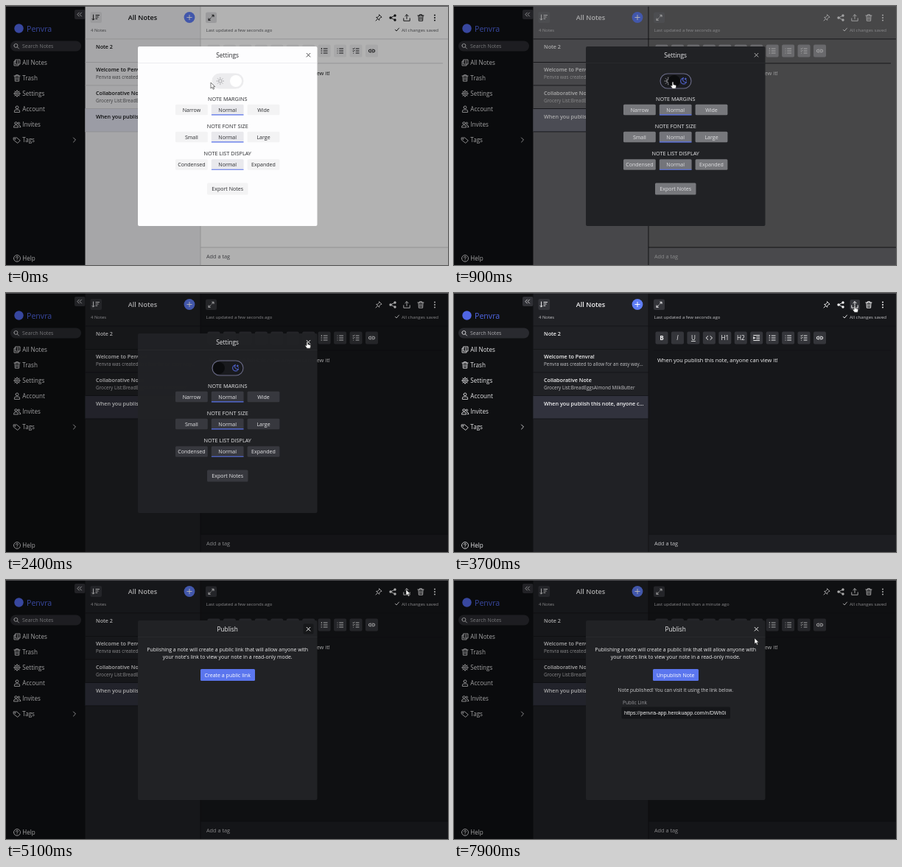
Write an HTML page that moves like this. It is 600 px wide and 352 px high and loops after 8000 ms.

```html
<!DOCTYPE html>
<html lang="en">
<head>
<meta charset="utf-8">
<title>Notes</title>
<style>
html, body { margin: 0; width: 100%; height: 100%; overflow: hidden; background: #0f1012; }
svg { display: block; width: 600px; height: 352px; }
text { font-family: "Open Sans", "Noto Sans", sans-serif; white-space: pre; }
.b { font-weight: 600; }
.m { text-anchor: middle; }
.i { fill: none; stroke-width: .95; stroke-linecap: round; stroke-linejoin: round; }
.side { fill: #e6e6e8; }
.side .i { stroke: #e6e6e8; stroke-width: .85; }
.ink { fill: var(--ink); }
.i.ink { fill: none; stroke: var(--ink); }
.sub { fill: var(--sub); }
.mtext { fill: var(--mtext); }
.glyph { opacity: var(--glyph); }
</style>
</head>
<body>
<svg id="stage" viewBox="0 0 600 352" xmlns="http://www.w3.org/2000/svg"></svg>
<script>
const LOOP = 8000;
const stage = document.getElementById('stage');
const APP = 'Penvra';

const rect = (x, y, w, h, fill, r = 0, more = '') =>
  `<rect x="${x}" y="${y}" width="${w}" height="${h}" rx="${r}" fill="${fill}" ${more}/>`;
const text = (x, y, size, str, cls = '', more = '') =>
  `<text x="${x}" y="${y}" font-size="${size}" class="${cls}" ${more}>${str}</text>`;
const icon = (x, y, d, cls = '', more = '') =>
  `<path class="i ${cls}" transform="translate(${x} ${y})" d="${d}" ${more}/>`;
const dot = (r, x = 0, y = 0) => `M${x - r} ${y}a${r} ${r} 0 1 0 ${2 * r} 0a${r} ${r} 0 1 0 ${-2 * r} 0`;
const rays = (n, a, b) => Array.from({ length: n }, (_, k) => {
  const c = Math.cos(k * 2 * Math.PI / n), s = Math.sin(k * 2 * Math.PI / n);
  return `M${(c * a).toFixed(2)} ${(s * a).toFixed(2)}L${(c * b).toFixed(2)} ${(s * b).toFixed(2)}`;
}).join('');

const D = {
  notes: 'M-2-4h6v6h-6zM-2-2h-2v6h6v-2M0-2h2M0 0h2',
  trash: 'M-4-3h8M-1.5-3v-1.3h3v1.3M-3-3l.4 7.2h5.2l.4-7.2M-1-1v3.4M1-1v3.4',
  gear: dot(1.4) + dot(3.3) + rays(8, 3.4, 4.4),
  user: dot(1.9, 0, -2.2) + 'M-3.6 4v-1q0-2 2-2h3.2q2 0 2 2v1z',
  users: dot(1.6, -1.5, -1.8) + dot(1.3, 2.3, -1.6) + 'M-4.6 3.6q0-3 3.1-3t3.1 3zM2.3.9q2.6 0 2.6 2.7h-1.5',
  tag: 'M-4.5-3h4.2l4.6 4-3.6 3.4-5.2-4.2z' + dot(.5, -2.6, -1.2),
  help: dot(4.5) + 'M-1.4-1q0-1.5 1.4-1.5t1.4 1.3q0 .8-1.4 1.5v.6M0 2.4v.1',
  search: dot(2.5, -.6, -.6) + 'M1.3 1.3l2.2 2.2',
  sort: 'M-3.5-3.5v7l-1.5-1.5M-3.5 3.5l1.5-1.5M0-3h4.5M0-.6h3.2M0 1.8h1.8',
  expand: 'M.8-.8l2.6-2.6M1.2-3.5h2.3v2.3M-.8.8l-2.6 2.6M-1.2 3.5h-2.3v-2.3',
  pin: 'M.8-4l3.2 3.2-1.5.4-1.7 1.8-.2 1.9-3.9-3.9 1.9-.2 1.8-1.7zM-1.3 1.3l-2.7 2.7',
  share: 'M3-3l-6 3 6 3',
  upload: 'M0 1.5v-5.7M-2.2-2.2l2.2-2.2 2.2 2.2M-4.2.8v3.4h8.4v-3.4',
  check: 'M-2.6.2l1.7 1.8 3.3-3.9',
  code: 'M-1.6-2.4l-2.6 2.4 2.6 2.4M1.6-2.4l2.6 2.4-2.6 2.4',
  indent: 'M-4-3.5h8M0-1.2h4M0 1.2h4M-4 3.5h8M-3.8-1.2l2 1.2-2 1.2z',
  ol: 'M-1-3h5M-1 0h5M-1 3h5M-3.8-3.6v1.3M-4.2 0h.8M-4.2 3h.8',
  ul: 'M-1-3h5M-1 0h5M-1 3h5M-3.6-3v.1M-3.6 0v.1M-3.6 3v.1',
  todo: 'M0-3h4M0 0h4M0 3h4M-4.2-3l.7.8 1.4-1.6M-4.2 0l.7.8 1.4-1.6M-3.4 3v.1',
  link: 'M-.8 1.8h-1.6a1.8 1.8 0 0 1 0-3.6h1.6M.8-1.8h1.6a1.8 1.8 0 0 1 0 3.6h-1.6M-1.8 0h3.6',
  close: 'M-2.4-2.4l4.8 4.8M2.4-2.4l-4.8 4.8',
  moon: 'M-.4-4.2a4.2 4.2 0 1 0 4.6 5.6a3.8 3.8 0 0 1-4.6-5.6zM2.8-4v2.2M1.7-2.9h2.2M4-.6v.1'
};

function sidebar() {
  const rows = [['notes', 'All Notes', 77], ['trash', 'Trash', 98], ['gear', 'Settings', 119],
    ['user', 'Account', 140], ['users', 'Invites', 161], ['tag', 'Tags', 182], ['help', 'Help', 343]];
  return rect(0, 0, 107.5, 352, '#0f1012') + rect(93, 5, 14.5, 13, '#303136', 2) +
    `<g class="side">` +
    icon(99.7, 11.5, 'M-.4-2.5l-2.4 2.5 2.4 2.5M2.8-2.5l-2.4 2.5 2.4 2.5') +
    rect(6, 47.5, 96, 14, '#292a2f', 7) + icon(14, 54.5, D.search) +
    text(22, 57, 6.9, 'Search Notes', '', 'fill="#a9a9ad"') +
    rows.map(([d, s, y]) => icon(15, y, D[d]) + text(22.3, y + 3, 8.1, s)).join('') +
    icon(93, 182, 'M-1.5-3l3 3-3 3') + `</g>` +
    `<circle cx="17.5" cy="30.5" r="6.2" fill="#5066e4"/>` +
    text(28, 34.6, 10.6, APP, '', 'fill="#5066e4" font-weight="500"');
}

function noteList() {
  return rect(107.5, 0, 156.5, 352, 'var(--list)') +
    rect(107.5, 139.5, 156.5, 31.5, 'var(--sel)') +
    [0, 1, 2, 3, 4].map(n => rect(107.5, 44.5 + n * 31.5, 156.5, .8, 'var(--line)')).join('') +
    rect(114.5, 8, 15.5, 15, 'var(--chip)', 2) + icon(122, 15.5, D.sort, 'ink glyph') +
    text(185.5, 18.9, 9.1, 'All Notes', 'b m ink') +
    `<circle cx="249" cy="15.5" r="7.4" fill="#5f7df4"/>` +
    icon(249, 15.5, 'M-3.2 0h6.4M0-3.2v6.4', '', 'stroke="#fff"') +
    text(115, 35, 5.9, '4 Notes', 'sub') +
    text(122, 57.6, 7.2, 'Note 2', 'b ink') +
    text(122, 89.4, 7.2, `Welcome to ${APP}!`, 'b ink') +
    text(122, 99, 6.35, `${APP} was created to allow for an easy way...`, 'sub') +
    text(122, 121.2, 7.2, 'Collaborative Note', 'b ink') +
    text(122, 130.6, 6.35, 'Grocery List:BreadEggsAlmond MilkButter', 'sub') +
    text(122, 153, 7.2, 'When you publish this note, anyone c...', 'b ink');
}

function editor() {
  const tools = ['B', 'I', 'U', 'code', 'H1', 'H2', 'indent', 'ol', 'ul', 'todo', 'link'];
  const style = { B: 'font-weight="700"', I: 'font-style="italic"', U: 'text-decoration="underline"' };
  const bar = tools.map((k, n) => {
    const x = 282 + n * 21.45;
    return rect(x - 8.5, 52.5, 17, 17, 'var(--tool)', 2) +
      (D[k] ? icon(x, 61, D[k], 'ink glyph') : text(x, 64, 8.2, k, 'm ink glyph', style[k] || ''));
  }).join('');
  return rect(264, 0, 336, 352, 'var(--ed)') + rect(264, 328, 336, 24, 'var(--foot)') +
    rect(263.5, 0, .9, 352, 'var(--line)') + rect(264, 44.5, 336, .8, 'var(--line)') +
    rect(271, 77.5, 322, .8, 'var(--line)') + rect(264, 327.6, 336, .9, 'var(--line)') +
    rect(271, 8.5, 15, 14.5, 'var(--chip)', 2) + icon(278.5, 15.8, D.expand, 'ink glyph') +
    `<text id="saved" x="271.5" y="34.6" font-size="6.05" class="sub"></text>` +
    icon(531, 32, D.check, 'ink', 'stroke-width=".8"') + text(537, 34.6, 6.1, 'All changes saved', 'sub') +
    rect(537.5, 9, 13.5, 14, 'var(--chip)', 2, 'id="hover"') +
    `<g class="glyph">` +
    icon(506, 16, D.pin, 'ink') + icon(525, 16, D.share, 'ink') +
    [[522, 16], [528, 13], [528, 19]].map(([x, y]) => `<circle class="ink" cx="${x}" cy="${y}" r="1.7"/>`).join('') +
    icon(544, 16, D.upload, 'ink') + icon(563, 16, D.trash, 'ink') +
    [-3.4, 0, 3.4].map(d => `<circle class="ink" cx="582" cy="${16 + d}" r="1"/>`).join('') +
    text(276, 94.2, 7.43, 'When you publish this note, anyone can view it!', 'ink') + `</g>` +
    bar + text(272, 343.4, 7.3, 'Add a tag', 'sub');
}

function settings() {
  const groups = [['NOTE MARGINS', 129, ['Narrow', 'Normal', 'Wide']],
    ['NOTE FONT SIZE', 166, ['Small', 'Normal', 'Large']],
    ['NOTE LIST DISPLAY', 203.4, ['Condensed', 'Normal', 'Expanded']]];
  const body = groups.map(([title, y, names]) => text(300.7, y, 7.3, title, 'm mtext') +
    names.map((s, n) => {
      const x = 230 + n * 48.8;
      return rect(x, y + 4.8, 43.8, 14.5, n === 1 ? 'var(--on)' : 'var(--btn)', 1.5) +
        (n === 1 ? rect(x, y + 18.3, 43.8, 1.1, '#5872ec', .5) : '') +
        text(x + 21.9, y + 14.7, 7.05, s, 'm mtext glyph');
    }).join('')).join('');
  return `<g id="settings">` + text(300.7, 69.6, 8.3, 'Settings', 'm mtext') +
    rect(280, 92, 42, 20, 'var(--pill)', 10, 'stroke="var(--rim)" stroke-width="1.1"') +
    icon(290.8, 102, dot(2.2) + rays(8, 3.7, 4.8), '', 'style="stroke:var(--sun);stroke-width:.8"') +
    icon(311.5, 102, D.moon, '', 'id="moon" stroke="#5a70ee"') +
    `<circle id="knob" cy="102" r="8" fill="var(--knob)"/>` + body +
    rect(273, 240.5, 55.5, 16, 'var(--btn)', 1.5) + text(300.7, 251.2, 7.05, 'Export Notes', 'm mtext glyph') + `</g>`;
}

function publish() {
  const action = (id, x, w, s) => `<g id="${id}">` + rect(x, 121, w, 16, '#5b76ee', 1.5) +
    text(300.7, 131.6, 7.05, s, 'm', 'fill="#fff"') + `</g>`;
  return `<g id="publish" fill="#ededee">` + text(300.7, 69.6, 8.3, 'Publish', 'm') +
    text(300.7, 97.2, 6.98, 'Publishing a note will create a public link that will allow anyone with', 'm') +
    text(300.7, 106.9, 6.98, 'your note\'s link to view your note in a read-only mode.', 'm') +
    action('create', 264, 74, 'Create a public link') + action('undo', 270, 62, 'Unpublish Note') +
    `<g id="result">` +
    text(300.7, 151.8, 6.52, 'Note published! You can visit it using the link below.', 'm', 'fill="#d0d0d2"') +
    text(229, 169.4, 6.65, 'Public Link', '', 'fill="#98989c"') +
    rect(227.5, 172.5, 147.5, 16, '#151619', 1.5) +
    text(231, 183, 7.15, 'https://penvra-app.herokuapp.com/n/DWh0i', '',
      'style="font-family:\'Liberation Sans\',Arial,sans-serif"') + `</g></g>`;
}

stage.innerHTML = sidebar() + noteList() + editor() +
  `<g id="dialog">` + rect(0, 0, 600, 352, '#000', 0, 'opacity=".3"') +
  rect(179, 55, 243.5, 244, 'var(--modal)', 2) + rect(179, 77, 243.5, .8, 'var(--rule)') +
  settings() + publish() +
  rect(403.5, 59.5, 14, 14, '#17181a', 2, 'id="focus"') +
  icon(410.5, 66.7, D.close, '', 'style="stroke:var(--close)"') + `</g>` +
  rect(0, 0, 600, .9, '#505053') +
  `<g id="cursor" stroke="#222" stroke-width=".6" stroke-linejoin="round" fill="#fff">` +
  `<path id="arrow" d="M0 0v8l1.9-1.7 1.3 2.9 1.4-.6-1.3-2.8h2.5z"/>` +
  `<path id="hand" d="M-.9.6q.9-1.2 1.8 0v3.2l3 .7q1 .3.8 1.4l-.7 3.3h-4.4l-2.6-3.6q.5-1.2 2.1-.2z"/></g>`;

const el = {};
stage.querySelectorAll('[id]').forEach(n => el[n.id] = n);

// colours that fade from light to dark
const FADE = {
  list: ['#eeeef0', '#202125'], ed: ['#ffffff', '#16171a'], foot: ['#fbfbfc', '#1d1e22'],
  sel: ['#dddfec', '#31323d'], chip: ['#dedee1', '#34353a'],
  btn: ['#f3f3f4', '#38393f'], on: ['#e9e9ed', '#393a41'], close: ['#444446', '#f4f4f4']
};
// colours that switch at once
const SWAP = {
  ink: ['#111214', '#f4f4f5'], sub: ['#55565a', '#c4c4c7'], mtext: ['#2a2b2e', '#e8e8ea'],
  line: ['#cbcbce', '#121316'],
  modal: ['#fdfdfe', '#212225'], rule: ['#eaeaec', '#2a2b2f'], pill: ['#ececee', '#1a1b1f'],
  rim: ['#ececee', '#6c6d8a'], sun: ['#9a9a9e', '#c4c4c8'], knob: ['#ffffff', '#0b0c0e']
};
const TOOL = ['#f0f0f2', '#34353a'], TOOL_LAG = 70;
const THEME = [[650, 0], [700, .14], [800, .4], [900, .66], [1000, .88], [1100, .99], [1200, 1]];
const KNOB = [[650, 312], [700, 307], [900, 299], [1100, 289]];
const DIALOG = [[2400, 1], [2800, 0], [4600, 0], [5050, 1]];
const RESULT = [[6500, 0], [7100, 1]];
const PATH = [[100, 278, 104], [500, 297, 103], [1600, 297, 103], [2350, 409, 66], [3000, 409, 66],
  [3700, 544, 17], [3850, 544, 17], [3950, 543.5, 16], [4100, 543.5, 16], [4400, 543, 13],
  [5250, 543, 13], [6100, 305, 129], [6600, 305, 129], [7000, 310, 139], [7200, 310, 139], [7900, 408, 79]];
const HAND = [[300, 1720], [2280, 2700], [3620, 4700], [5950, 6850]];

function at(track, t, col = 1, ease = x => x) {
  if (t <= track[0][0]) return track[0][col];
  const n = track.findIndex(k => k[0] > t);
  if (n < 0) return track[track.length - 1][col];
  const a = track[n - 1], b = track[n];
  return a[col] + (b[col] - a[col]) * ease((t - a[0]) / (b[0] - a[0]));
}
const smooth = x => x * x * (3 - 2 * x);
const mix = ([a, b], p) => 'rgb(' + [1, 3, 5].map(i => {
  const u = parseInt(a.slice(i, i + 2), 16), v = parseInt(b.slice(i, i + 2), 16);
  return Math.round(u + (v - u) * p);
}) + ')';
const show = (node, on) => node.style.display = on ? '' : 'none';
const setVar = (name, value) => stage.style.setProperty('--' + name, value);

function draw(t) {
  const p = at(THEME, t), dark = t >= 650;
  for (const k in FADE) setVar(k, mix(FADE[k], p));
  for (const k in SWAP) setVar(k, SWAP[k][+dark]);
  setVar('tool', mix(TOOL, at(THEME, t - TOOL_LAG)));
  setVar('glyph', dark ? Math.min(1, p * 1.4) : 1);
  show(el.moon, dark);
  el.knob.setAttribute('cx', at(KNOB, t));

  const open = at(DIALOG, t);
  show(el.dialog, open > 0);
  el.dialog.style.opacity = open;
  show(el.settings, t < 3500);
  show(el.publish, t >= 3500);
  show(el.focus, t >= 3500 && t < 6300);
  show(el.create, t < 6500);
  show(el.undo, t >= 6500);
  el.result.style.opacity = at(RESULT, t);
  show(el.hover, t >= 3620 && t < 4700);
  el.saved.textContent = 'Last updated ' + (t < 7400 ? 'a few seconds ago' : 'less than a minute ago');

  const hand = HAND.some(([a, b]) => t >= a && t < b);
  show(el.hand, hand);
  show(el.arrow, !hand);
  el.cursor.setAttribute('transform', `translate(${at(PATH, t, 1, smooth)} ${at(PATH, t, 2, smooth)})`);
}

const start = performance.now();
function tick() {
  draw((performance.now() - start) % LOOP);
  requestAnimationFrame(tick);
}
tick();
</script>
</body>
</html>
```
